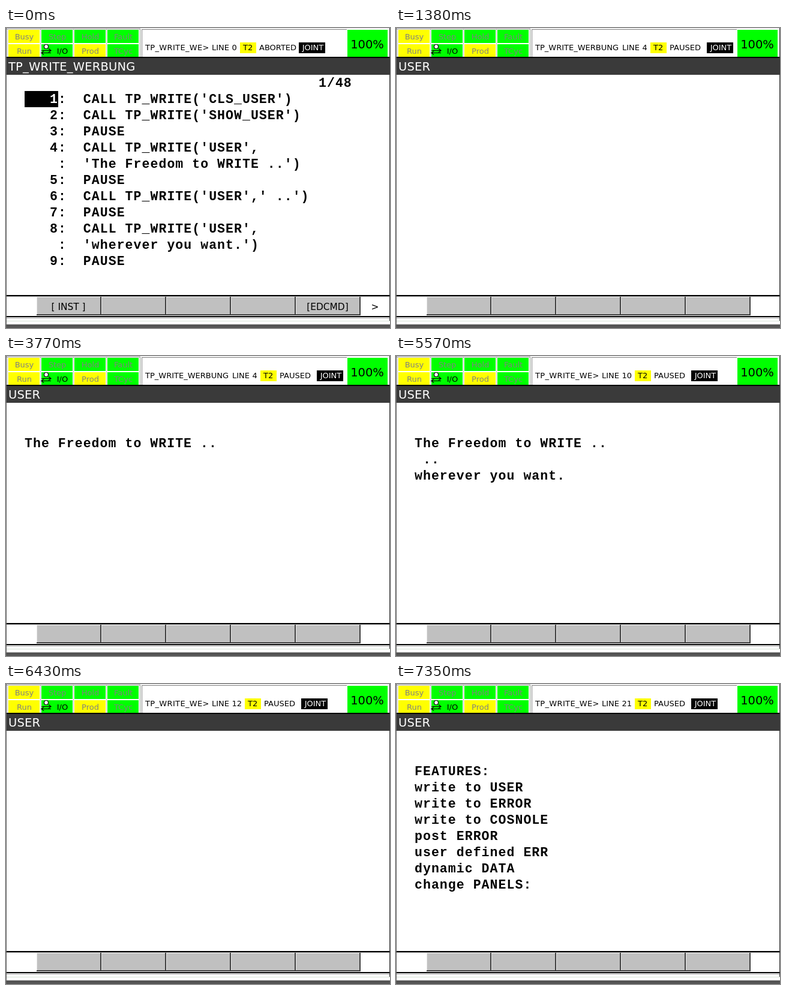
Write an HTML page that moves like this. It is 640 px wide and 500 px high and loops after 8 s.

```html
<!DOCTYPE html>
<html>
<head>
<meta charset="utf-8">
<style>
  html, body { margin: 0; width: 100%; height: 100%; overflow: hidden; background: #fff; }
  svg { display: block; }
  text { font: 13px "DejaVu Sans", sans-serif; white-space: pre; }
  .big { font-size: 19.5px; }
  .key { font-size: 15.4px; }
  .mono { font: bold 21.5px "Liberation Mono", monospace; letter-spacing: 1.05px; }
</style>
</head>
<body>
<svg id="stage" width="640" height="500" viewBox="0 0 640 500"></svg>
<script>
const LOOP = 8000;
const YELLOW = '#ffff00', GREEN = '#00ff00';
const PROGRAM = [
  "CALL TP_WRITE('CLS_USER')", "CALL TP_WRITE('SHOW_USER')", "PAUSE",
  "CALL TP_WRITE('USER',", "'The Freedom to WRITE ..')", "PAUSE",
  "CALL TP_WRITE('USER',' ..')", "PAUSE",
  "CALL TP_WRITE('USER',", "'wherever you want.')", "PAUSE"
];
const SLOGAN = ['The Freedom to WRITE ..', ' ..', 'wherever you want.'];
const FEATURES = ['FEATURES:', 'write to USER', 'write to ERROR', 'write to COSNOLE',
  'post ERROR', 'user defined ERR', 'dynamic DATA', 'change PANELS:'];

// start time, program line, text on the user page
const STEPS = [
  { at: 0, line: 0, editor: true },
  { at: 1180, line: 0, editor: true, busy: true },
  { at: 1380, line: 4, lines: [] },
  { at: 3770, line: 4, lines: SLOGAN.slice(0, 1) },
  { at: 4040, line: 6, lines: SLOGAN.slice(0, 1) },
  { at: 4700, line: 6, lines: SLOGAN.slice(0, 2) },
  { at: 4960, line: 8, lines: SLOGAN.slice(0, 2) },
  { at: 5360, line: 8, lines: SLOGAN },
  { at: 5570, line: 10, lines: SLOGAN },
  { at: 6430, line: 12, lines: [] },
  { at: 7220, line: 12, lines: FEATURES },
  { at: 7350, line: 21, lines: FEATURES }
];

const rect = (x, y, w, h, fill) =>
  `<rect x="${x}" y="${y}" width="${w}" height="${h}" fill="${fill}"/>`;
const text = (x, y, s, attrs = '') => `<text x="${x}" y="${y}" ${attrs}>${s}</text>`;
const mid = (x, y, s, attrs = '') => text(x, y, s, 'text-anchor="middle" ' + attrs);
const stroke = d => `<path d="${d}" fill="none" stroke="#000" stroke-width="1.2"/>`;
const rowY = i => 125 + 27 * i;

// ring with an open foot and an arrow curling inside
const loopIcon = y => stroke(`M4 ${y + 15.5}h5v-4M8.500 ${y + 14}A6 6 0 1 1 15 ${y + 14}` +
  `v1.500h5M9 ${y + 8}a3 3 0 1 1 3 4`);

const ioIcon = stroke('M59 37.500H75M71 34.500l4 3l-4 3M75 41.500H59M63 38.500l-4 3l4 3') +
  '<circle cx="67" cy="31" r="3.5" fill="#fff" stroke="#000" stroke-width="1.2"/>';

function lamps(busy) {
  const names = ['Busy', 'Step', 'Hold', 'Fault', 'Run', 'I/O', 'Prod', 'TCyc'];
  return names.map((name, i) => {
    const col = i % 4, row = i >> 2, x = 4 + 55 * col, y = 3 + 24 * row;
    const run = busy && col === 0, active = run || name === 'I/O';
    const yellow = !run && (col === 0 || name === 'Prod');
    return rect(x - 2, y - 1, 1, 24, '#c0c0c0') +
      rect(x, y, 52, 22 - row, yellow ? YELLOW : GREEN) +
      (run ? loopIcon(y - 1) : '') +
      mid(x + 26.5 + (active ? 8.5 : 0), y + 16, name, `fill="${active ? '#000' : '#808080'}"`);
  }).join('') + ioIcon;
}

function status({ line, editor }) {
  const full = line > 0 && line < 10;
  const x = full ? 377 : 343;
  const badge = x + 47 + (line > 9 ? 8 : 0);
  const joint = badge + (editor ? 98 : 94);
  return rect(226, 2, 342, 46, '#808080') + rect(227, 3, 341, 45, '#fff') +
    (full ? text(232, 37, 'TP_WRITE_WERBUNG')
      : text(232, 37, 'TP_WRITE_WE&gt;', 'letter-spacing=".35"')) +
    text(x, 37, 'LINE') + text(x + 33.5, 37, line) +
    rect(badge, 24, 27, 18, YELLOW) + text(badge + 5, 37, 'T2') +
    text(badge + 32, 37, editor ? 'ABORTED' : 'PAUSED') +
    rect(joint, 24, 44, 18, '#000') + mid(joint + 23.5, 37, 'JOINT', 'fill="#fff"');
}

function listing() {
  let n = 0;
  return text(521, 98, '1/48', 'class="mono"') + rect(31, 105, 56, 27, '#000') +
    PROGRAM.map((code, i) => {
      const y = rowY(i), label = code[0] === "'" ? '' : ++n;
      return text(73, y, label, `class="mono" fill="${i ? '#000' : '#fff'}"`) +
        text(87, y, ':  ' + code, 'class="mono"');
    }).join('');
}

function softKeys(editor) {
  let s = rect(0, 445, 640, 2, '#000') + rect(0, 447, 640, 1, '#a0a0a0');
  for (let i = 0; i < 5; i++) {
    const x = 51 + 108 * i;
    s += rect(x, 448, 108, 31, '#404040') + rect(x, 448, 106, 29, '#e8e8e8') +
      rect(x + 1, 449, 105, 28, '#c0c0c0');
  }
  s += rect(0, 480, 640, 2, '#000') + rect(0, 483, 640, 1, '#a0a0a0') +
    rect(0, 488, 640, 1, '#d8e4d8') + rect(0, 494, 640, 6, '#555');
  if (editor) s += mid(104, 470, '[ INST ]', 'class="key"') +
    mid(536, 470, '[EDCMD]', 'class="key"') + mid(615, 470, '&gt;', 'class="key"');
  return s;
}

function screen(step) {
  const { editor, lines } = step;
  return rect(0, 0, 640, 500, '#fff') +
    rect(0, 0, 640, 1, '#e8e8e8') + rect(0, 1, 224, 1, '#909090') + rect(223, 1, 1, 47, '#909090') +
    lamps(step.busy) + status(step) +
    rect(569, 3, 67, 45, GREEN) + mid(602, 34, '100%', 'class="big"') +
    rect(0, 48, 640, 2, '#000') + rect(0, 50, 640, 28, '#3a3a3a') +
    text(4, 71, editor ? 'TP_WRITE_WERBUNG' : 'USER',
      'class="big" fill="#fff" letter-spacing=".2"') +
    (editor ? listing() : lines.map((s, i) => text(31, rowY(i + 1), s, 'class="mono"')).join('')) +
    softKeys(editor) +
    rect(0, 0, 1, 500, '#606060') + rect(639, 0, 1, 488, '#303030');
}

const stage = document.getElementById('stage');
const start = performance.now();
let shown;
function tick() {
  const t = (performance.now() - start) % LOOP;
  const step = STEPS.filter(s => s.at <= t).pop();
  if (step !== shown) stage.innerHTML = screen(shown = step);
  requestAnimationFrame(tick);
}
tick();
</script>
</body>
</html>
```
